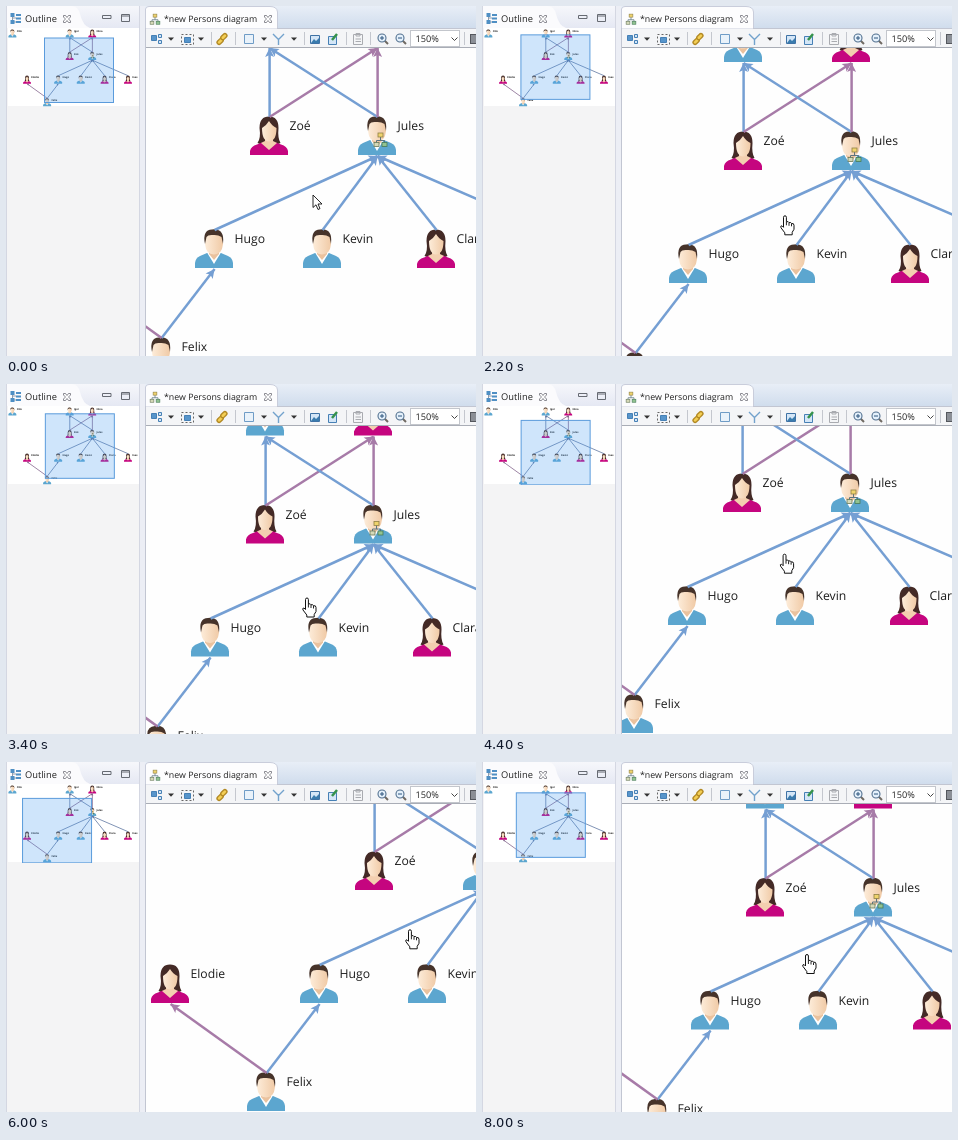
An HTML page for the animation above (9200 ms loop, 470 by 350 pixels).

```html
<!DOCTYPE html>
<html lang="en">
<head>
<meta charset="utf-8">
<title>Persons diagram</title>
<style>
  html, body { margin: 0; width: 100%; height: 100%; overflow: hidden; background: #fff; }
  svg { display: block; }
  text { font-family: "Open Sans", "Noto Sans", sans-serif; fill: #222; text-rendering: geometricPrecision; }
  .name { font-size: 12.2px; font-weight: var(--weight); fill: #1c1c1c; }
  .link { fill: none; stroke-width: var(--w); }
  .thin { fill: none; stroke-width: 1; }
  #main { --w: 2.5; --weight: 400; --man: #759fd3; --woman: #a77ba8; }
  #mini { --w: 3.6; --weight: 700; --man: #566f9c; --woman: #7d5c86; }
</style>
</head>
<body>
<svg id="stage" width="470" height="350" viewBox="0 0 470 350">
  <defs>
    <linearGradient id="bar" x2="0" y2="1">
      <stop offset="0" stop-color="#f6f7fb"/><stop offset="1" stop-color="#e5e8f3"/>
    </linearGradient>
    <linearGradient id="tabs" x2="0" y2="1">
      <stop offset="0" stop-color="#e8eef7"/><stop offset="1" stop-color="#cfdcec"/>
    </linearGradient>
    <linearGradient id="skin">
      <stop offset="0" stop-color="#fdecd9"/><stop offset="1" stop-color="#f0caa6"/>
    </linearGradient>
    <clipPath id="canvas"><rect x="140" y="42" width="330" height="308"/></clipPath>
    <clipPath id="sheet"><rect x="2" y="22" width="131" height="79"/></clipPath>

    <g id="man">
      <path d="M-19 0V-5Q-18.500 -10 -14 -12L-7 -15H7L14 -12Q18.500 -10 19 -5V0Z" fill="#5ca6cf"/>
      <path d="M-7 -15.500L0 -4L7 -15.500Z" fill="#fff"/>
      <path d="M-5 -19H5V-14L0 -8L-5 -14Z" fill="#eac29e"/>
      <path d="M-8.500 -30Q-8 -37 0 -37Q8 -37 8.500 -30L9 -24Q8 -13.500 0 -13.500Q-8 -13.500 -9 -24Z" fill="url(#skin)"/>
      <path d="M-9 -24Q-12 -38 -2 -38.500Q11 -40 9 -24L7.500 -31Q4 -33.500 -1 -33Q-6 -33.500 -7.500 -31Z" fill="#46332a"/>
    </g>
    <g id="woman">
      <path d="M-11.500 -12Q-8 -17 -9.500 -27Q-9.500 -38.500 0 -38.500Q9.500 -38.500 9.500 -27Q8.500 -17 11.500 -12Q5 -9 0 -12Q-5 -9 -11.500 -12Z" fill="#442a26"/>
      <path d="M-19 0V-4Q-18 -9 -12 -10.500L-7 -12.500H7L12 -10.500Q18 -9 19 -4V0Z" fill="#c5057f"/>
      <path d="M-4 -20H4V-14L8 -12L0 -5L-8 -12L-4 -14Z" fill="#f3cfb0"/>
      <path d="M-7 -27Q-3 -29 0 -34Q3 -29 7.500 -27Q7.500 -14 0 -13.500Q-7 -14 -7 -27Z" fill="url(#skin)"/>
    </g>
    <g id="tree">
      <path class="thin" d="M0 -3V1M-4 4V1H4V4" stroke="#5c7480"/>
      <rect x="-2.500" y="-6.500" width="5" height="4" fill="#efd36d" stroke="#8f8045" stroke-width=".8"/>
      <rect x="-6.500" y="3" width="5" height="4" fill="#d5d9b8" stroke="#66795a" stroke-width=".8"/>
      <rect x="1.500" y="3" width="5" height="4" fill="#92c391" stroke="#467a57" stroke-width=".8"/>
    </g>
    <path id="close" d="M-3.500 -3.500H-1.500L0 -1.500L1.500 -3.500H3.500V-2L1.500 0L3.500 2V3.500H1.500L0 1.500L-1.500 3.500H-3.500V2L-1.500 0L-3.500 -2Z"
          fill="#fff" stroke="#6e6e76" stroke-width=".8"/>
    <path id="caret" d="M-3 -1.500H3L0 1.700Z" fill="#333"/>
    <g id="lens">
      <path d="M2.500 2.500L6 6" stroke="#6f6a63" stroke-width="2"/>
      <circle r="4" fill="#e4f0fb" stroke="#52708f" stroke-width="1.100"/>
    </g>
    <g id="scene"></g>
  </defs>

  <rect width="470" height="350" fill="#eceef5"/>

  <!-- outline view -->
  <rect x="1" width="133" height="22" fill="url(#bar)"/>
  <path d="M1 22V0H66Q72 0 74 8Q77 20 84 22Z" fill="#fbfbfd"/>
  <rect x="1" y="22" width="132" height="328" fill="#f4f4f5"/>
  <rect x="2" y="22" width="131" height="78" fill="#fff"/>
  <path class="thin" d="M.5 0V350M133.500 0V350" stroke="#d4d7e2"/>
  <g fill="#4f8fc4">
    <path class="thin" d="M6.500 9V16H10M6.500 12H10" stroke="#8f9bab"/>
    <rect x="4.500" y="7" width="4" height="4"/><rect x="4.500" y="14" width="4" height="4"/>
    <rect x="10" y="8" width="5" height="2"/><rect x="10" y="11.500" width="5" height="2"/><rect x="10" y="15" width="5" height="2"/>
  </g>
  <text x="19" y="15.800" font-size="9.300">Outline</text>
  <use href="#close" x="61" y="13"/>
  <path class="thin" d="M96.500 9.500H105V12.500H96.500ZM115.500 8.500H123.500V15.500H115.500ZM115.500 10H123.500" stroke="#666a72"/>
  <g clip-path="url(#sheet)">
    <use id="mini" href="#scene" transform="translate(8.700 22.900) scale(.209)"/>
    <rect id="view" x="38.500" y="32" width="69" height="64.500" fill="#4f9ff0" fill-opacity=".27" stroke="#5a9bdc"/>
  </g>

  <!-- editor -->
  <rect x="139" y="41" width="331" height="309" fill="#fefefe"/>
  <g clip-path="url(#canvas)">
    <use id="main" href="#scene"/>
  </g>
  <rect x="139" width="331" height="23" fill="url(#tabs)"/>
  <path d="M139.500 23V3Q140 .5 143 .5H264Q271 .5 271.500 6V23Z" fill="#fdfdfe" stroke="#c9cddb"/>
  <rect x="140" y="23" width="330" height="19" fill="#f4f5f7"/>
  <path class="thin" d="M139.500 22V350M271 22.500H470" stroke="#c2c6d2"/>
  <path class="thin" d="M140 41.500H470" stroke="#a9adb6"/>
  <use href="#tree" transform="translate(149 13) scale(.75)"/>
  <text x="158" y="16" font-size="8.800">*new Persons diagram</text>
  <use href="#close" x="262" y="13"/>

  <!-- toolbar -->
  <path class="thin" d="M205.500 26V39M229.500 26V39M298.500 26V39M340.500 26V39M364.500 26V39M458.500 26V39" stroke="#c4c7ce"/>
  <g fill="#d4e6f7" stroke="#4680b5" stroke-width="1">
    <path d="M145.500 29.500H150.500V34.500H145.500Z" fill="#5795cb"/>
    <path d="M152.500 28.500H155.500V31.500H152.500ZM152.500 34.500H155.500V37.500H152.500Z"/>
    <path d="M175.500 28.500H187.500V38.500H175.500Z" fill="none" stroke="#666" stroke-dasharray="2 2"/>
    <path d="M178.500 31.500H184.500V36.500H178.500Z" fill="#5795cb"/>
    <path d="M238.500 28.500H247.500V37.500H238.500Z" fill="#e9f2fa" stroke="#6f9cc6"/>
    <path d="M267 28L272.500 33.500L278 28M272.500 33.500V39" fill="none" stroke="#72a2cc" stroke-width="1.400"/>
    <path d="M304.500 29.500H313.500V37.500H304.500Z" stroke="#3f72a5"/>
    <path d="M305 37L308 33L310 35L313 32V37Z" fill="#3a7cae" stroke="none"/>
    <path d="M322.500 30.500H330.500V38.500H322.500Z"/>
    <path d="M326 34L331 28" stroke="#35924c" stroke-width="2.500"/>
  </g>
  <g fill="none" stroke="#b38a25" stroke-width="1.400">
    <rect x="-4" y="-2" width="7" height="4" rx="2" fill="#f4cf55" transform="translate(214.500 35) rotate(-45)"/>
    <rect x="-3" y="-2" width="7" height="4" rx="2" fill="#f4cf55" transform="translate(217.500 31) rotate(-45)"/>
  </g>
  <path class="thin" d="M347.500 28.500H356.500V38.500H347.500ZM350 27.500H354V30H350ZM349.500 33H355M349.500 35.500H355" stroke="#a9abb0"/>
  <use href="#lens" x="376" y="32"/><use href="#lens" x="394" y="32"/>
  <path class="thin" d="M374 32H378M376 30V34M392 32H396" stroke="#2c557c"/>
  <rect x="404.500" y="24.500" width="49" height="16" fill="#fff" stroke="#c3c6cc"/>
  <text x="409.500" y="36.300" font-size="9.200">150%</text>
  <path class="thin" d="M445.500 31.500L448.500 34.500L451.500 31.500" stroke="#444"/>
  <rect x="464.500" y="28.500" width="8" height="9" fill="#8b8f96" stroke="#54575d"/>
  <g id="carets"></g>

  <path id="arrow" d="M307 189V201.500L310 198.800L312 203.500L314 202.600L312 198H316Z" fill="#fff" stroke="#111" stroke-width=".9"/>
  <g id="hand">
    <path d="M303.500 188.500Q303.500 187 305 187Q306.400 187 306.400 188.500V193Q308.500 192.200 309 193.800Q311 193.100 311.500 194.700Q314 194.200 314 196.500V200.500L312.200 203.500V206H304.800V204L301 199Q300 197 302 197L303.500 198.500Z"
          fill="#fff" stroke="#111" stroke-width="1" stroke-linejoin="round"/>
    <path class="thin" d="M306.400 193V196.500M309 194V197M311.500 195V197.500" stroke="#222" stroke-width=".8"/>
  </g>
</svg>
<script>
const NS = 'http://www.w3.org/2000/svg';
const $ = id => document.getElementById(id);
const add = (parent, tag, attrs, text) => {
  const el = parent.appendChild(document.createElementNS(NS, tag));
  for (const k in attrs) el.setAttribute(k, attrs[k]);
  if (text) el.textContent = text;
  return el;
};

for (const x of [165, 195, 258, 288]) add($('carets'), 'use', { href: '#caret', x, y: 33 });

// x of the centre, y of the feet
const people = {
  Otis:   [-11, 41, 'man'],
  Igor:   [263, 41, 'man'],
  Nina:   [371, 41, 'woman'],
  Zoé:    [263, 149, 'woman'],
  Jules:  [371, 149, 'man'],
  Elodie: [59, 262, 'woman'],
  Hugo:   [208, 262, 'man'],
  Kevin:  [316, 262, 'man'],
  Clara:  [430, 262, 'woman'],
  Ines:   [542, 262, 'woman'],
  Felix:  [155, 370, 'man']
};
const links = [
  ['Zoé', 'Igor'], ['Zoé', 'Nina'], ['Jules', 'Igor'], ['Jules', 'Nina'],
  ['Hugo', 'Jules'], ['Kevin', 'Jules'], ['Clara', 'Jules'], ['Ines', 'Jules'],
  ['Felix', 'Hugo'], ['Felix', 'Elodie']
];

const scene = $('scene');
for (const [name, [x, y, kind]] of Object.entries(people)) {
  add(scene, 'use', { href: '#' + kind, x, y });
  add(scene, 'text', { class: 'name', x: x + 20.5, y: y - 25 }, name);
}
const lines = add(scene, 'g', { transform: 'translate(.6 1)' });
for (const [child, parent] of links) {
  const [x1, y1] = people[child], [x2, y2, kind] = people[parent];
  const color = `var(--${kind})`;
  const angle = Math.atan2(y2 - y1 + 39, x2 - x1) * 180 / Math.PI;
  add(lines, 'path', { class: 'link', d: `M${x1} ${y1 - 39}L${x2} ${y2}`, style: `stroke: ${color}` });
  add(lines, 'path', { d: 'M0 0L-9 -4.5L-7 0L-9 4.5Z', style: `fill: ${color}`, transform: `translate(${x2} ${y2}) rotate(${angle})` });
}
add(scene, 'use', { href: '#tree', x: 374.5, y: 133.5 });

// time, pan x, pan y
const LOOP = 9200, STEP = 200, GRAB = 1400, LEAD = .6, SCALE = .209;
const pan = [
  [0, 0, 0],
  [1800, 0, 2], [2000, -1, 7], [2200, -2, 15], [2400, -2, 28], [2600, -3, 38], [2800, -4, 20],
  [3000, -4, 0], [3200, -4, 2], [3400, -4, 10.5], [3600, -4, 38], [3800, -4, 6], [4000, -3, -21],
  [4400, -3, -21], [4600, -2, -14], [4800, 18, -8], [5000, 56, -10], [5200, 92, -17], [5400, 108, -21],
  [6000, 105, -21], [6200, 95, -18], [6400, 72, -17], [6600, 40, -19], [6800, 21, -21], [7000, 20.5, -21],
  [7400, 20.5, -19], [7600, 20, -11], [7800, 20, -1], [8000, 20, 5.5]
];
const move = (el, x, y) => el.setAttribute('transform', `translate(${x} ${y})`);

function draw(t) {
  let i = pan.length - 1;
  while (pan[i][0] > t) i--;
  const [at, x, y] = pan[i], next = pan[i + 1];
  // the pointer runs ahead of the canvas while dragging
  const lead = next && next[0] - at === STEP ? LEAD : 0;
  const [, nx, ny] = lead ? next : pan[i];
  move($('main'), x, y);
  move($('view'), -x * SCALE, -y * SCALE);
  move($('hand'), x + (nx - x) * lead, y + (ny - y) * lead);
  $('hand').style.display = t < GRAB ? 'none' : '';
  $('arrow').style.display = t < GRAB ? '' : 'none';
}

const start = performance.now();
(function tick() {
  draw((performance.now() - start) % LOOP);
  requestAnimationFrame(tick);
})();
</script>
</body>
</html>
```
